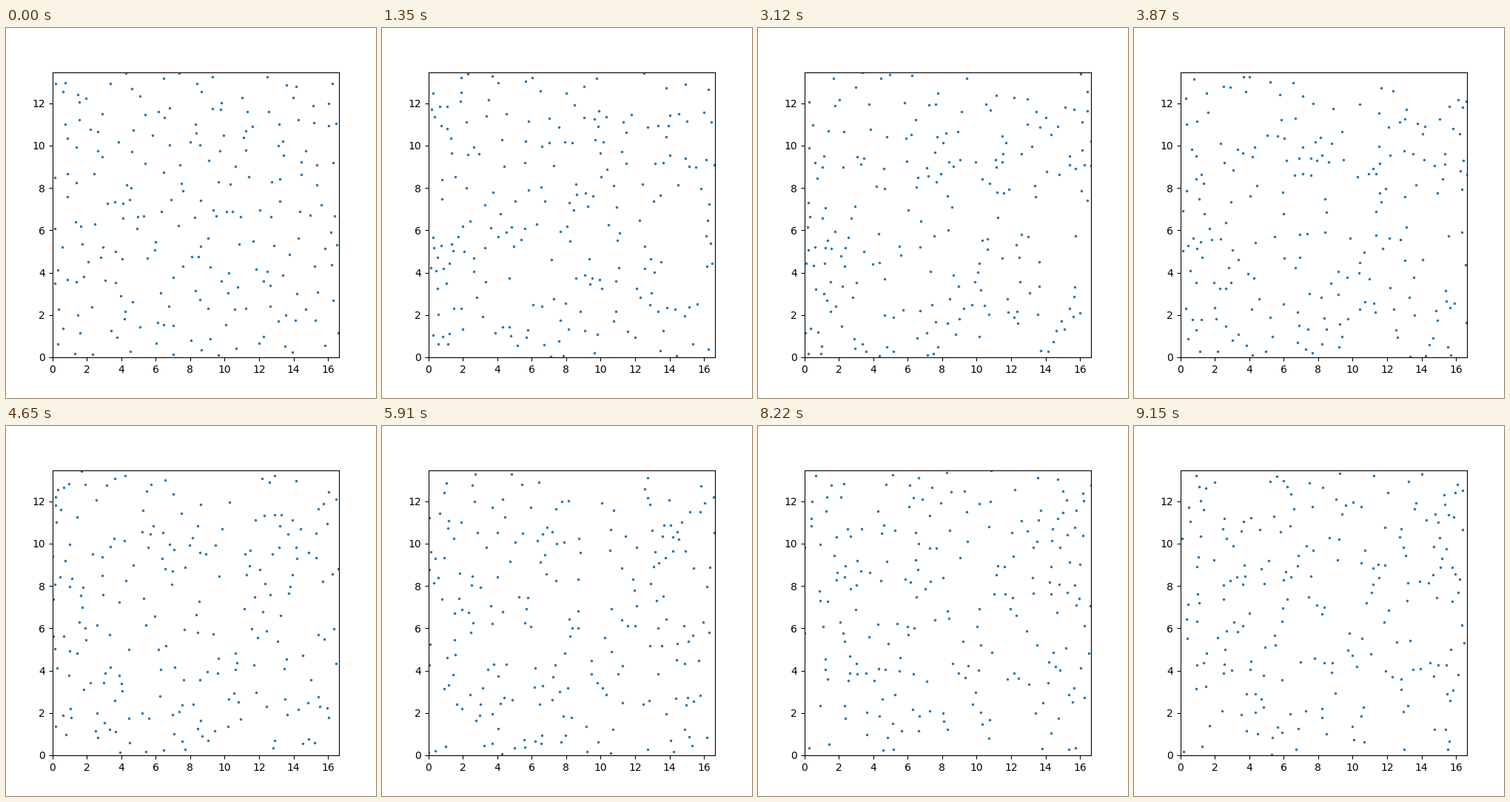
Recreate the animation shown at these times as a matplotlib script. Size 500 by 500 pixels, loop 9.18 s.

```python
import numpy as np
import matplotlib.pyplot as plt
from matplotlib.animation import FuncAnimation

COLS, ROWS = 15, 14
BOX = np.array([16.636, 13.455])
SIGMA = 0.34
CUTOFF = 3 * SIGMA
SPEED = 0.022              # rms distance per frame
EPS = 0.25 * SPEED**2      # half of the thermal energy
FRAMES, WARMUP, SUBSTEPS = 306, 25, 4


def lattice():
    """Triangular lattice that fills the periodic box."""
    row, col = np.divmod(np.arange(COLS * ROWS), COLS)
    x = (col + 0.25 + 0.5 * (row % 2)) / COLS
    y = (row + 0.5) / ROWS
    return np.column_stack([x, y]) * BOX


def forces(pos):
    """Lennard-Jones forces between nearest periodic images."""
    dx, dy = (np.subtract.outer(p, p) for p in pos.T)
    dx -= BOX[0] * np.round(dx / BOX[0])
    dy -= BOX[1] * np.round(dy / BOX[1])
    r2 = dx * dx + dy * dy
    i, j = np.nonzero((r2 < CUTOFF**2) & (r2 > 0))
    d2 = r2[i, j]
    s6 = (SIGMA**2 / d2) ** 3
    f = 24 * EPS * (2 * s6 * s6 - s6) / d2
    n = len(pos)
    return np.column_stack([
        np.bincount(i, f * dx[i, j], n),
        np.bincount(i, f * dy[i, j], n),
    ])


def simulate():
    """Velocity Verlet run; returns the positions for every frame."""
    rng = np.random.default_rng(7)
    pos = lattice()
    vel = rng.normal(0, SPEED / np.sqrt(2), pos.shape)
    vel -= vel.mean(axis=0)
    acc = forces(pos)
    dt = 1 / SUBSTEPS
    path = []
    for step in range(WARMUP + FRAMES):
        if step >= WARMUP:
            path.append(pos.copy())
        for _ in range(SUBSTEPS):
            vel += 0.5 * dt * acc
            pos = (pos + dt * vel) % BOX
            acc = forces(pos)
            vel += 0.5 * dt * acc
    return path


path = simulate()

fig, ax = plt.subplots(figsize=(5, 5), dpi=100)
ax.set_xlim(0, BOX[0])
ax.set_ylim(0, BOX[1])
dots, = ax.plot([], [], ".", ms=3, color="#1f77b4")


def update(frame):
    dots.set_data(*path[frame].T)
    return dots,


anim = FuncAnimation(fig, update, frames=FRAMES, interval=30,
                     repeat=True, repeat_delay=0)
plt.show()
```
